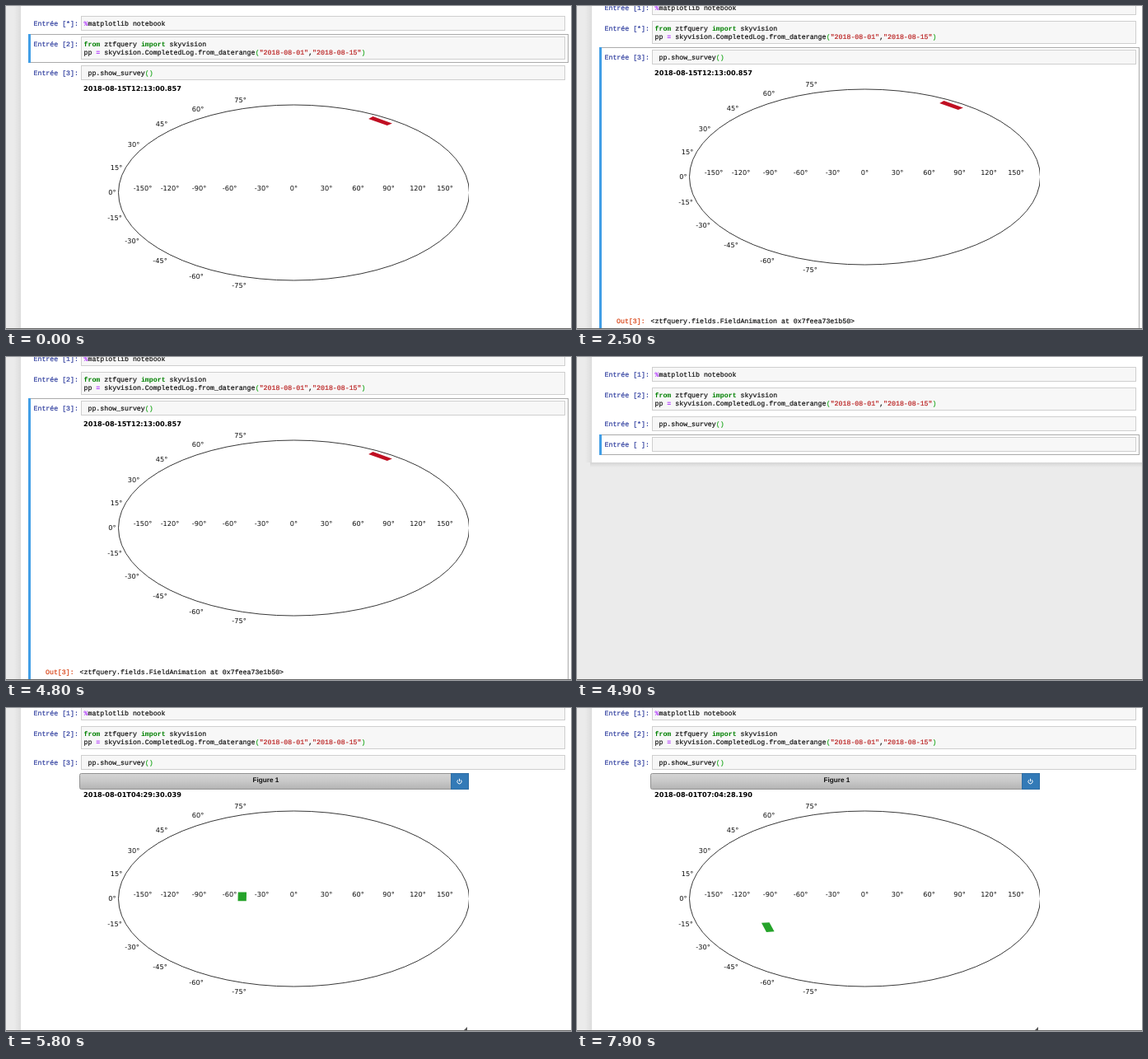
Animation of 686x392 px, one loop 8000 ms. Source, as an HTML page with a canvas:

```html
<!DOCTYPE html>
<html lang="fr">
<head>
<meta charset="utf-8">
<title>Sky survey notebook</title>
<style>
html, body { margin: 0; width: 100%; height: 100%; overflow: hidden; background: #fff; }
canvas { display: block; width: 686px; height: 392px; }
</style>
</head>
<body>
<canvas id="stage" width="686" height="392"></canvas>
<script>
const ctx = document.getElementById('stage').getContext('2d');
ctx.textRendering = 'geometricPrecision';
const LOOP = 8000, W = 686, H = 392, CHAR = 4.957;
const MONO = '8.26px "Liberation Mono", monospace';
const LABEL = '8.2px "DejaVu Sans", sans-serif';
const INK = '#111', KEYWORD = '#008000', OPERATOR = '#aa22ff', STRING = '#ba2121', PAREN = '#2a2';

const SKY = { x: 349.5, y: 226.5, rx: 213, ry: 106.5 };
const LONGITUDES = [166, 199, 234.5, 271.5, 310.5, 349.5, 389, 427.5, 464.5, 500, 533];
const LATITUDES = [[283, 339], [231, 328], [187, 309], [153, 285], [132, 257], [129, 226],
  [134, 196], [155, 168], [189, 143], [233, 125], [284.5, 113.5]];

// time, x and y from the sky centre
const POINTING = [[5500, -50, 18], [6200, -80, -30], [6900, -51.5, -62.5],
  [7400, -88, -52], [7700, -60, 4], [7900, -118, 34.5]];

function text(str, x, y, font, color, align = 'left') {
  ctx.font = font;
  ctx.fillStyle = color;
  ctx.textAlign = align;
  ctx.fillText(str, x, y);
}

function code(x, y, parts) {
  for (const [str, color = INK, bold] of parts) {
    text(str, x, y, (bold ? 'bold ' : '') + MONO, color);
    if (!bold) {
      ctx.strokeStyle = color;
      ctx.lineWidth = 0.2;
      ctx.strokeText(str, x, y);
    }
    x += str.length * CHAR;
  }
}

function box(x, y, w, h, fill, stroke) {
  ctx.fillStyle = fill;
  ctx.fillRect(x, y, w, h);
  ctx.strokeStyle = stroke;
  ctx.lineWidth = 1;
  ctx.strokeRect(x + 0.5, y + 0.5, w - 1, h - 1);
}

function gradient(x0, y0, x1, y1, ...colors) {
  const g = ctx.createLinearGradient(x0, y0, x1, y1);
  colors.forEach((c, i) => g.addColorStop(i / (colors.length - 1), c));
  return g;
}

function cell(y, h, count, lines) {
  box(91, y, 588, h, '#f7f7f7', '#cfcfcf');
  code(33.5, y + 11.7, [[`Entrée [${count}]:`, '#303f9f']]);
  lines.forEach((parts, i) => code(94.5, y + 11.7 + i * 10, parts));
}

function selection(y, h) {
  box(27, y, 656, h, '#fff', '#ababab');
  ctx.fillStyle = '#429fe6';
  ctx.fillRect(27, y, 3, h);
}

// Hammer projection, scaled to the unit ellipse
function project(lon, lat) {
  const d = Math.sqrt(1 + Math.cos(lat) * Math.cos(lon / 2));
  return [Math.cos(lat) * Math.sin(lon / 2) / d, Math.sin(lat) / d];
}

function unproject(x, y) {
  const z = Math.sqrt(1 - (x * x + y * y) / 2);
  return [2 * Math.atan2(z * Math.SQRT2 * x, 2 * z * z - 1), Math.asin(z * Math.SQRT2 * y)];
}

function field(dx, dy, color) {
  const [lon, lat] = unproject(dx / SKY.rx, -dy / SKY.ry);
  const half = 4 * Math.PI / 180;
  ctx.beginPath();
  for (const [a, b] of [[-1, -1], [1, -1], [1, 1], [-1, 1]]) {
    const v = lat + b * half;
    const [x, y] = project(lon + a * half / Math.cos(v), v);
    ctx.lineTo(SKY.x + x * SKY.rx, SKY.y - y * SKY.ry);
  }
  ctx.fillStyle = color;
  ctx.fill();
}

function pointing(t) {
  const i = Math.max(1, POINTING.findIndex(p => p[0] >= t));
  const [t0, x0, y0] = POINTING[i - 1], [t1, x1, y1] = POINTING[i];
  const k = (t - t0) / (t1 - t0);
  return [x0 + (x1 - x0) * k, y0 + (y1 - y0) * k];
}

function plot(stamp, patch, color) {
  text(stamp, 94, 103, 'bold 8.2px "DejaVu Sans", sans-serif', '#000');
  ctx.save();
  ctx.beginPath();
  ctx.rect(89, 90, 473, 260);
  ctx.clip();
  if (patch) field(...patch, color);
  ctx.beginPath();
  ctx.ellipse(SKY.x, SKY.y, SKY.rx, SKY.ry, 0, 0, 2 * Math.PI);
  ctx.strokeStyle = '#222';
  ctx.lineWidth = 0.9;
  ctx.stroke();
  ctx.restore();
  LONGITUDES.forEach((x, i) => text(`${i * 30 - 150}°`, x, 224, LABEL, INK, 'center'));
  LATITUDES.forEach(([x, y], i) => text(`${i * 15 - 75}°`, x, y + 3, LABEL, INK, 'center'));
}

function toolbar(title) {
  ctx.beginPath();
  ctx.roundRect(89.5, 94.5, 472, 19, 2);
  ctx.fillStyle = gradient(0, 94, 0, 114, '#d6d6d6', '#c8c8c8', '#b2b2b2');
  ctx.fill();
  ctx.strokeStyle = '#929292';
  ctx.lineWidth = 1;
  ctx.stroke();
  box(540, 94, 22, 20, '#337ab7', '#2e6da4');
  ctx.strokeStyle = '#fff';
  ctx.beginPath();
  ctx.arc(550.5, 104.3, 2.6, -0.9, Math.PI + 0.9);
  ctx.moveTo(550.5, 100.8);
  ctx.lineTo(550.5, 104.3);
  ctx.stroke();
  if (title) text(title, 315.5, 104.8, 'bold 8.2px "Liberation Sans", sans-serif', INK, 'center');
}

function page(bottom) {
  ctx.fillStyle = '#ebebeb';
  ctx.fillRect(0, 0, W, H);
  ctx.fillStyle = gradient(10, 0, 18, 0, '#ebebeb', '#dcdcdc');
  ctx.fillRect(10, 0, 8, bottom);
  if (bottom < H) {
    ctx.fillStyle = gradient(0, bottom, 0, bottom + 6, '#d4d4d4', '#ebebeb');
    ctx.fillRect(16, bottom, W, 6);
  }
  ctx.fillStyle = '#fff';
  ctx.fillRect(18, 0, W, bottom);
}

function scrollAt(t) {
  if (t < 2500) return 0;
  if (t < 4900) return 19;
  const k = Math.min(1, Math.max(0, (t - 5400) / 300));
  return Math.round(15 * k * (2 - k));
}

function draw(now) {
  const t = Math.floor((now % LOOP) / 100) * 100;
  const finished = t < 4900, cleared = t >= 4900 && t < 5100, plotted = t >= 5300;

  page(cleared ? 128 : H);
  ctx.save();
  ctx.translate(0, -scrollAt(t));

  if (t < 2500) selection(34, 35);
  else if (finished) selection(69, 360);
  else if (cleared) selection(94, 25);

  cell(12, 18, t < 1200 ? '*' : 1, [[['%', OPERATOR, true], ['matplotlib notebook']]]);
  cell(37, 28, t >= 2500 && t < 3600 ? '*' : 2, [
    [['from', KEYWORD, true], [' ztfquery '], ['import', KEYWORD, true], [' skyvision']],
    [['pp '], ['=', OPERATOR, true], [' skyvision.CompletedLog.from_daterange'], ['(', PAREN],
      ['"2018-08-01"', STRING], [','], ['"2018-08-15"', STRING], [')', PAREN]]
  ]);
  cell(72, 18, finished || plotted ? 3 : '*', [[[' pp.show_survey'], ['()', PAREN]]]);

  if (finished) {
    plot('2018-08-15T12:13:00.857', [105.3, -87], '#c00f22');
    code(48, 403.7, [['Out[3]:', '#d84315']]);
    code(89.5, 403.7, [['<ztfquery.fields.FieldAnimation at 0x7feea73e1b50>']]);
  } else if (cleared) {
    cell(97, 18, ' ', []);
  } else {
    toolbar(plotted && 'Figure 1');
    if (plotted) {
      const date = new Date(Date.UTC(2018, 7, 1, 5, 50, 40, 499) + Math.round((t - 6900) * 4427.691));
      ctx.translate(0, 20);
      plot(date.toISOString().slice(0, 23), t >= 5500 && pointing(t), '#25a32a');
      ctx.beginPath();
      ctx.moveTo(560, 382);
      ctx.lineTo(560, 387);
      ctx.lineTo(555, 387);
      ctx.fillStyle = '#555';
      ctx.fill();
    }
  }
  ctx.restore();

  ctx.fillStyle = '#666';
  ctx.fillRect(0, 391, W, 1);
}

const start = performance.now();
function tick() {
  draw(performance.now() - start);
  requestAnimationFrame(tick);
}
tick();
</script>
</body>
</html>
```
